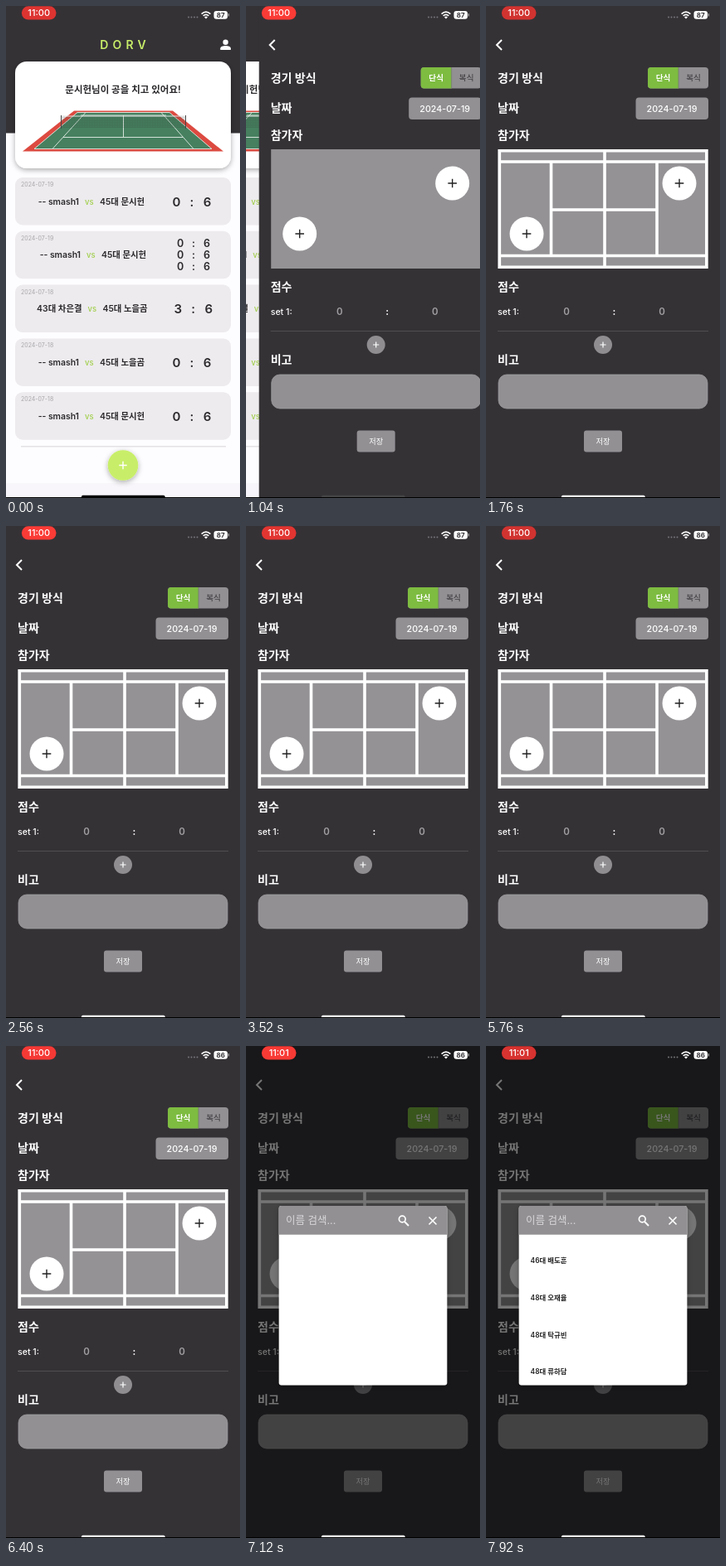
Recreate the animation shown at these times as an HTML page. Size 282x594 px, loop 8 s.

```html
<!DOCTYPE html>
<html lang="ko">
<head>
<meta charset="utf-8">
<title>Match log</title>
<style>
  html, body { margin: 0; width: 100%; height: 100%; overflow: hidden; background: #353236; }
  svg { display: block; width: 100%; height: 100%; font-family: Inter, "Noto Sans CJK KR", "Noto Sans CJK", sans-serif; }
  text { white-space: pre; }
</style>
</head>
<body>
<svg id="stage" viewBox="0 0 282 594">
  <defs>
    <filter id="shadow" x="-20%" y="-20%" width="140%" height="150%">
      <feDropShadow dx="0" dy="2" stdDeviation="3" flood-color="#000" flood-opacity=".32"/>
    </filter>
    <pattern id="mesh" width="2" height="2" patternUnits="userSpaceOnUse">
      <path d="M0 0H2M0 0V2" stroke="#35463c" stroke-width=".6"/>
    </pattern>
  </defs>
</svg>
<script>
const DARK = '#353236', GREY = '#929093', LIME = '#c8ee69', BLUE = '#2b8ff5';

// Drawing helpers, each returning SVG markup
const text = (x, y, size, str, fill = '#fff', weight = 500, anchor = 'start', extra = '') =>
  `<text x="${x}" y="${y}" font-size="${size}" fill="${fill}" font-weight="${weight}" text-anchor="${anchor}" ${extra}>${str}</text>`;
const mid = (x, y, size, str, fill, weight, extra) => text(x, y, size, str, fill, weight, 'middle', extra);
const rect = (x, y, w, h, r, fill, extra = '') =>
  `<rect x="${x}" y="${y}" width="${w}" height="${h}" rx="${r}" fill="${fill}" ${extra}/>`;
const disc = (x, y, r, fill, extra = '') => `<circle cx="${x}" cy="${y}" r="${r}" fill="${fill}" ${extra}/>`;
const line = (d, stroke, width, extra = '') =>
  `<path d="${d}" fill="none" stroke="${stroke}" stroke-width="${width}" ${extra}/>`;
const shape = (d, fill) => `<path d="${d}" fill="${fill}"/>`;
const plus = (x, y, r, color, width) => line(`M${x - r} ${y}h${2 * r}M${x} ${y - r}v${2 * r}`, color, width);
const group = (id, ...parts) => `<g id="${id}">${parts.join('')}</g>`;
const SHADOW = 'filter="url(#shadow)"';

function perspectiveCourt() {
  return shape('M82 126.5H201L262 175.5H20Z', '#dc4a40') +
    shape('M86 128.5H197L248 172.5H34Z', '#46805f') +
    line('M86 128.5H197L248 172.5H34ZM96 128.5L56 172.5M187 128.5L226 172.5M69 158.5H213M90 132H193M141.5 132V158.5', '#e4ece6', .9) +
    rect(67, 133, 149, 14, 0, 'url(#mesh)', 'opacity=".6"') +
    line('M67 133H216', '#dde2e0', 1) + line('M66.5 132V148M216.5 132V148', '#444', 1);
}

const VISITOR = '-- smash1', HOST = '45대 문시헌', BEAR = '45대 노을곰';
const matches = [
  ['19', VISITOR, HOST, 0, [[0, 6]]],
  ['19', VISITOR, HOST, 2, [[0, 6], [0, 6], [0, 6]]],
  ['18', '43대 차은결', BEAR, 3.5, [[3, 6]]],
  ['18', VISITOR, BEAR, 0, [[0, 6]]],
  ['18', VISITOR, HOST, 0, [[0, 6]]],
];

function matchCard([day, left, right, dx, sets], i) {
  const y = 207 + i * 64.8, many = sets.length > 1;
  const scores = sets.map(([a, b], k) => {
    const base = y + (many ? 18.7 + 14.4 * k : 34.5);
    const xs = many ? [210, 226, 242] : [205.5 + dx / 2, 224 + dx / 2, 242.5 + dx / 2];
    return [a, ':', b].map((c, j) => mid(xs[j], base, many ? 12.5 : 15, c, '#2b292c', 600)).join('');
  });
  return rect(11, y, 260, 57.5, 9, '#edebee') +
    text(18, y + 11, 7, `2024-07-${day}`, '#a9a7aa', 400) +
    text(88 + dx, y + 32.5, 10.4, left, '#2b292c', 600, 'end') +
    mid(100.3 + dx, y + 32.5, 9.5, 'vs', '#a2cf4c', 500) +
    text(113 + dx, y + 32.5, 10.4, right, '#2b292c', 600) + scores.join('');
}

const home = group('home',
  rect(0, 0, 282, 594, 0, '#fdfcfe'),
  rect(0, 0, 282, 153.5, 0, DARK),
  mid(143.5, 52, 14, 'DORV', LIME, 600, 'letter-spacing="5.2"'),
  disc(264.6, 43.7, 3.2, '#fff'), shape('M258.3 53v-1.8c0-4.3 12.6-4.3 12.6 0V53Z', '#fff'),
  rect(11, 67, 260, 129, 14, '#fff', SHADOW),
  mid(141, 104.5, 11.5, '문시헌님이 공을 치고 있어요!', '#2b292c', 600),
  perspectiveCourt(),
  ...matches.map(matchCard),
  rect(18, 531, 247, 1.5, 0, '#e4e2e5'),
  rect(0, 576, 282, 18, 0, '#f8f6fa'),
  disc(141, 554.5, 18.3, LIME, SHADOW),
  disc(141, 554.5, 18.3, '#fff', 'id="press" opacity="0"'),
  plus(141, 554.5, 4.7, '#fff', 1.4));

const slot = (x, y) => disc(x, y, 20.5, '#fff') + plus(x, y, 5.3, '#222', 1.4);
const label = (y, str) => text(14, y, 14, str, '#fff', 700);

const form = group('form',
  rect(0, 0, 282, 594, 0, DARK),
  line('M19 41L13 47L19 53', '#fff', 2),
  label(91.5, '경기 방식'), label(128, '날짜'), label(161, '참가자'), label(344, '점수'), label(432, '비고'),
  rect(195, 74, 73, 25.5, 4, GREY),
  '<path id="toggle" fill="#7dbc40"/>',
  line('M232 74V99.5', '#777', .8),
  mid(213.5, 90, 9.6, '단식', '#fff', 700, 'id="single"'),
  mid(250, 90, 9.6, '복식', DARK, 500, 'id="double"'),
  rect(180.5, 110.5, 87.5, 26.5, 4, GREY),
  mid(224, 127.6, 10.7, '2024-07-19'),
  rect(14.5, 173, 253, 144, 0, '#949295'),
  group('lines', line('M16.3 174.7H265.8V315.2H16.3ZM16 188H266M16 301.5H266M143 174V315M78.5 188V301.5M206 188V301.5M78.5 246H206', '#fff', 3.6)),
  slot(49, 275), slot(233, 214),
  group('pair', slot(49, 214), slot(233, 275)),
  text(14, 373, 10.6, 'set 1:'),
  mid(97, 373.3, 11.5, '0', '#a19fa2', 600), mid(154.5, 373, 11.5, ':', '#fff', 700), mid(212, 373.3, 11.5, '0', '#a19fa2', 600),
  line('M14 392.5H268', '#504d51', 1),
  disc(141, 409, 11, '#8f8d90'), plus(141, 409, 3.6, '#fff', 1.2),
  rect(15, 445, 252, 41, 10, GREY, 'stroke="#a3a1a4" stroke-width=".7"'),
  rect(118, 512.6, 46, 26, 3, GREY),
  mid(141, 529, 9.2, '저장'));

const column = i => 43.5 + 32.5 * i;
function dayCells() {
  let out = '';
  for (let day = 1; day <= 31; day++) {
    out += mid(column(day % 7), 287.3 + 30.3 * Math.floor(day / 7), 9, day, '#fff', 500, `id="day${day}"`);
  }
  return out;
}

const scrim = rect(0, 0, 282, 594, 0, '#000', 'opacity=".54"');
const calendar = group('calendar', scrim,
  rect(22, 115, 238, 373, 3, '#3b393c', SHADOW),
  text(39.7, 133.5, 7, 'SELECT DATE', '#fff', 500, 'start', 'letter-spacing="1"'),
  text(39.3, 188, 24.5, '', '#fff', 400, 'start', 'id="headline"'),
  shape('M228 183.5V186.5H231L239 178.5L236 175.5ZM236.8 174.7L239.8 177.7L241.2 176.3Q241.8 175.5 241 174.8L239.7 173.5Q239 172.8 238.2 173.4Z', '#fff'),
  text(39.2, 223.5, 10.2, 'July 2024', '#bcbabd', 600),
  shape('M93.5 218H102L97.8 222.3Z', '#bcbabd'),
  line('M207.7 216L203.7 220L207.7 224M238 216L242 220L238 224', '#bcbabd', 1.4),
  ...[...'SMTWTFS'].map((c, i) => mid(column(i), 256.5, 8, c, '#b2b0b3', 500)),
  disc(206, 344.6, 14.9, 'none', `stroke="${BLUE}" stroke-width="1"`),
  disc(0, 0, 15.2, BLUE, 'id="selected"'),
  dayCells(),
  text(155, 472.4, 9.9, 'CANCEL', BLUE, 600), text(223.5, 472.4, 9.9, 'OK', BLUE, 600));

const members = ['46대 배도훈', '48대 오재율', '48대 탁규빈', '48대 류하담'];
const search = group('search', scrim,
  rect(39.7, 193, 202.6, 216.6, 3, '#fff', SHADOW),
  shape('M39.7 227.7V196Q39.7 193 42.7 193H239.3Q242.3 193 242.3 196V227.7Z', GREY),
  text(48, 214.5, 12.5, '이름 검색...', '#d9d7da', 400),
  disc(188.3, 209, 3.9, 'none', 'stroke="#fff" stroke-width="1.7"'),
  line('M191 212L196 217', '#fff', 2),
  line('M220.5 206.5L229.5 215.5M229.5 206.5L220.5 215.5', '#fff', 1.6),
  group('members', ...members.map((name, i) => text(53.6, 262.3 + 44.7 * i, 8.4, name, '#222', 600))));

const status = rect(18.9, .3, 41.6, 16.2, 8, '#f00', 'id="pill"') +
  mid(39.7, 12.4, 11, '', '#fff', 500, 'id="clock"') +
  [220, 223.5, 227, 230.5].map(x => disc(x, 13.5, 1, '#77757a')).join('') +
  line('M235.6 9.6Q241 4.8 246.4 9.6M237.7 11.9Q241 9 244.3 11.9', '#fff', 1.7) +
  shape('M239 13.4Q241 11.8 243 13.4L241 15.5Z', '#fff') +
  rect(250.5, 6, 16.5, 9.7, 3, '#fff') + rect(267.7, 9, 1.2, 3.5, .6, '#aaa') +
  mid(258.7, 13.8, 8, '', DARK, 700, 'id="battery"') +
  rect(91, 590.7, 100.5, 4, 1.5, '#000', 'id="indicator"') +
  rect(0, 593, 282, 1, 0, '#000');

const $ = id => document.getElementById(id);
$('stage').insertAdjacentHTML('beforeend', home + form + calendar + search + status);

const set = (id, attrs) => { for (const k in attrs) $(id).setAttribute(k, attrs[k]); };
const ramp = (t, start, length) => Math.min(1, Math.max(0, (t - start) / length));
const show = (id, opacity) => set(id, { opacity, visibility: opacity > 0 ? 'visible' : 'hidden' });

function render(t) {
  // Page push with a third of the travel as parallax
  const pushed = t < 885 ? 0 : 1 - Math.exp((885 - t) / 54);
  set('home', { transform: `translate(${-94 * pushed})` });
  set('form', { transform: `translate(${282 * (1 - pushed)})` });
  set('press', { opacity: .3 * ramp(t, 680, 150) });
  show('lines', t >= 1100 ? 1 : 0);

  const doubles = t >= 1960 && t < 2440;
  show('pair', doubles ? 1 : 0);
  set('toggle', { d: doubles
    ? 'M232 74H264Q268 74 268 78V95.5Q268 99.5 264 99.5H232Z'
    : 'M232 74H199Q195 74 195 78V95.5Q195 99.5 199 99.5H232Z' });
  set('single', { fill: doubles ? DARK : '#fff' });
  set('double', { fill: doubles ? '#fff' : DARK });

  show('calendar', ramp(t, 3580, 150) - ramp(t, 5600, 120));
  const picked = t >= 4300;
  $('headline').textContent = picked ? 'Tue, Jul 23' : 'Fri, Jul 19';
  set('selected', picked ? { cx: 108.7, cy: 374.8 } : { cx: 206, cy: 344.6 });
  set('day19', { fill: picked ? BLUE : '#fff' });

  show('search', ramp(t, 6700, 150));
  show('members', ramp(t, 7240, 60));

  const glow = .5 - .5 * Math.cos((t - 1800) / 1000 * Math.PI);
  set('pill', { fill: `rgb(${206 + 48 * Math.sqrt(glow)},${51 + 9 * glow},${48 + 7 * glow})` });
  $('clock').textContent = t < 7000 ? '11:00' : '11:01';
  $('battery').textContent = t < 5500 ? '87' : '86';
  const level = 255 * ramp(t, 960, 300);
  set('indicator', { fill: `rgb(${level},${level},${level})` });
}

const began = performance.now();
function frame() {
  render((performance.now() - began) % 8000);
  requestAnimationFrame(frame);
}
frame();
</script>
</body>
</html>
```
